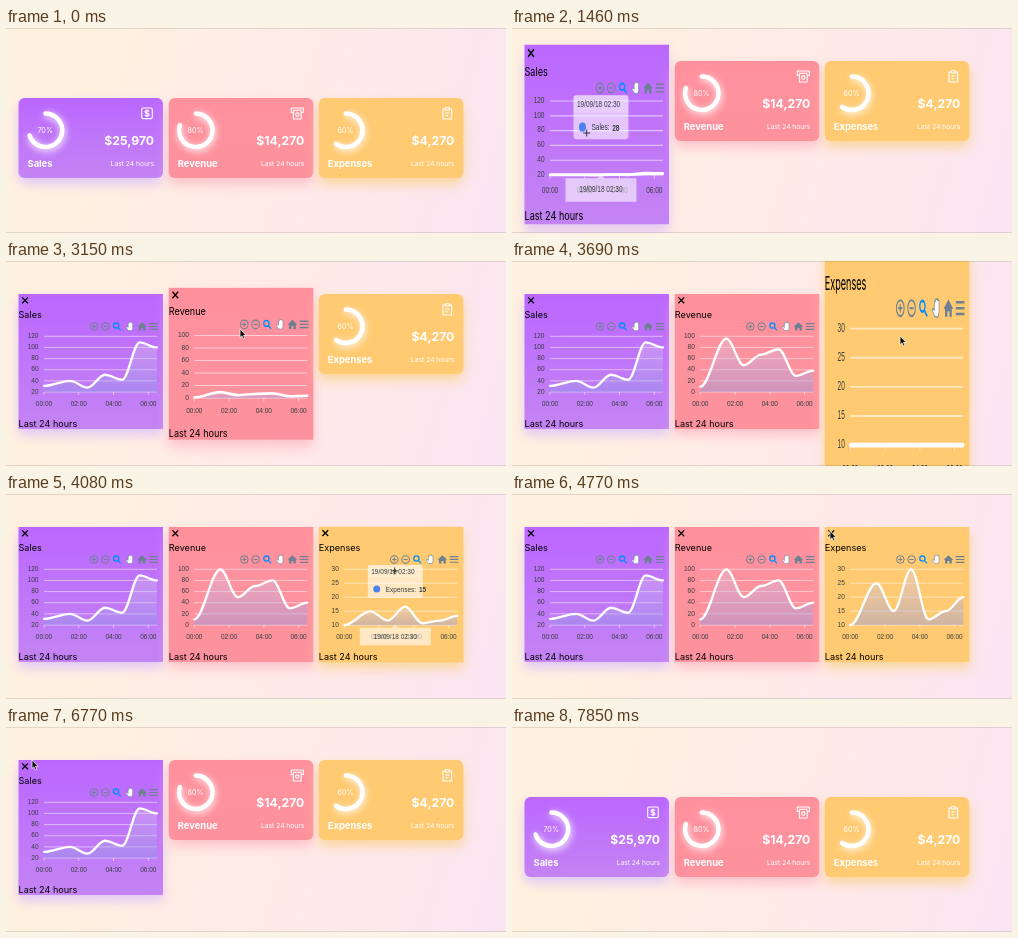
Recreate the animation shown at these times as an HTML page. Size 500 px wide and 205 px high, loop 8.54 s.

```html
<!DOCTYPE html>
<html lang="en">
<head>
<meta charset="utf-8">
<title>Dashboard cards</title>
<style>
  html, body { margin: 0; width: 100%; height: 100%; overflow: hidden; }
  body { background: linear-gradient(106.4deg, #fff1df 12%, #ffe9e9 62%, #fbe5f2 100%); }
  svg { display: block; width: 100%; height: 100%; }
  text { font-family: Inter, sans-serif; dominant-baseline: central; }
  .axis text, .tip text { font: 6.5px "Liberation Sans", Arial, sans-serif; fill: #373d3f; }
  .ring { fill: none; stroke: #fff; stroke-width: 4.5; stroke-linecap: round;
          filter: drop-shadow(1.2px 2.4px 3.5px #fff); }
  .icon { fill: none; stroke: #fff; stroke-width: 1.1; stroke-linejoin: round; }
  .tools { fill: none; stroke: #6e8192; stroke-width: 1; }
  .line { fill: none; stroke: #fff; stroke-width: 2.3; stroke-linecap: round; }
  .grid { stroke: #fff; stroke-opacity: .55; stroke-width: .9; }
</style>
</head>
<body>
<svg id="stage" viewBox="0 0 500 205"></svg>
<script>
const LOOP = 8540, FPS = 13, LAYOUT_MS = 450;
const W = 144.5, COMPACT_H = 80, ROW_OPEN = 33, ROW_IDLE = 70, FULL_H = 135;
const MID = ROW_OPEN + FULL_H / 2;
const PLOT = { left: 25.5, right: 138.5, top: 75.3, bottom: 131 };
const HOURS = [0, 1.5, 2.5, 3.5, 4.5, 5.5, 6.5];

const cards = [
  { title: 'Sales', x: 12.5, percent: 70, value: '$25,970', colors: ['#bb67ff', '#c484f3'], glow: '#e0c6f5',
    data: [31, 40, 28, 51, 42, 109, 100], min: 20, max: 120, step: 20, open: 1280, close: 7000,
    icon: '<rect x="123.2" y="10" width="10.6" height="10.6" rx="1.3"/><path d="M130.6 13.3Q130 12.6 128.5 12.6C125.9 12.6 126 15.2 128.5 15.3C131.2 15.4 131.2 18 128.5 18Q127 18 126.3 17.2M128.5 11.5V19"/>' },
  { title: 'Revenue', x: 162.8, percent: 80, value: '$14,270', colors: ['#ff919d', '#fc929d'], glow: '#fdc0c7',
    data: [10, 100, 50, 70, 80, 30, 40], min: 0, max: 100, step: 20, open: 2895, close: 6130,
    icon: '<path d="M124 14.5H122.5V10H134.5V14.5H133M124.5 12.3H132.5M124.6 12.5V21H132.4V12.5"/><circle cx="128.5" cy="16.6" r="1.7"/>' },
  { title: 'Expenses', x: 312.8, percent: 60, value: '$4,270', colors: ['#ffca71', '#ffca71'], glow: '#f9d59b',
    data: [10, 25, 15, 30, 12, 15, 20], min: 10, max: 30, step: 5, open: 3665, close: 4900,
    icon: '<path d="M126.3 11H124.2V21H132.8V11H130.7M126.5 9.8H130.5V12H126.5ZM126.4 15H130.6M126.4 17.8H129.4"/>' }
];

// time, x, y
const pointerPath = [
  [77, 418, 163], [770, 165, 110], [920, 110, 107], [1080, 74, 104], [2150, 74, 104],
  [2538, 228, 65], [2770, 234, 68], [3150, 234, 68], [3620, 388, 75], [4200, 388, 76],
  [4690, 319, 39], [4769, 318, 37], [5300, 318, 37], [5770, 174, 39], [5923, 172, 38],
  [6260, 172, 38], [6540, 27, 28], [6769, 26, 33], [6923, 18, 38], [7540, 18, 38],
  [7770, 494, 150], [7846, 494, 150]
];

const clamp = v => Math.max(0, Math.min(1, v));
const mix = (a, b, k) => a + (b - a) * k;
const text = (s, x, y, size, extra = '') => `<text x="${x}" y="${y}" font-size="${size}" ${extra}>${s}</text>`;
const hourX = h => mix(PLOT.left, PLOT.right, h / 6.5);
const clock = h => `0${Math.floor(h)}:${h % 1 ? '30' : '00'}`;

// cubic-bezier(.4, 0, .1, 1)
function layoutEase(x) {
  let lo = 0, hi = 1, s = .5;
  for (let i = 0; i < 24; i++) {
    s = (lo + hi) / 2;
    const at = 1.2 * s * (1 - s) ** 2 + .3 * s * s * (1 - s) + s ** 3;
    if (at < x) lo = s; else hi = s;
  }
  return 3 * s * s - 2 * s ** 3;
}

function compactMarkup(c) {
  const angle = c.percent / 100 * 2 * Math.PI, r = 16.7, cx = 27, cy = 32.3;
  const arc = `M${cx} ${cy - r}A${r} ${r} 0 1 1 ${cx + r * Math.sin(angle)} ${cy - r * Math.cos(angle)}`;
  return `<rect class="shadow" y="6" width="${W}" height="${COMPACT_H}" rx="6" fill="${c.glow}" filter="url(#blur)"/>
    <rect width="${W}" height="${COMPACT_H}" rx="6" fill="url(#bg${c.title})"/>
    <path class="ring" d="${arc}"/><g class="icon">${c.icon}</g>
    <g fill="#fff">${text(c.percent + '%', cx - .3, cy, 7.2, 'text-anchor="middle"')}
    ${text(c.title, 9, 65.5, 9.4, 'font-weight="700"')}
    ${text(c.value, 135.5, 42.5, 12.2, 'font-weight="700" text-anchor="end"')}
    ${text('Last 24 hours', 135.5, 66.3, 6.7, 'text-anchor="end"')}</g>`;
}

function axisMarkup(c) {
  let out = '';
  for (let v = c.min; v <= c.max; v += c.step) {
    const y = mix(PLOT.bottom, PLOT.top, (v - c.min) / (c.max - c.min));
    out += `<path class="grid" d="M${PLOT.left} ${y}H${PLOT.right}"/>` + text(v, 20, y - .8, 6.5, 'text-anchor="end"');
  }
  for (let h = 0; h <= 6; h += 2) {
    const x = hourX(h);
    out += `<path class="grid" d="M${x} ${PLOT.bottom}v3"/>` + text(clock(h), x, 142.3, 6.5, 'text-anchor="middle"');
  }
  return `<g class="axis">${out}</g>`;
}

const toolsMarkup = `<g class="tools">
  <circle cx="75.5" cy="65.5" r="3.8"/><path d="M73.5 65.5h4M75.5 63.5v4"/>
  <circle cx="86.8" cy="65.5" r="3.8"/><path d="M84.8 65.5h4"/>
  <g stroke="#008ffb" stroke-width="1.3"><circle cx="97.6" cy="64.6" r="2.6"/><path d="M99.6 66.6l2.7 2.8"/></g>
  <path stroke-width=".6" fill="#fff" d="M109.8 69.5L107.3 66.2L108.3 65.5L109.6 66.5V62.2H110.6V61.3H111.7V61H112.8V61.8H114.2V67.5L113.2 69.8Z"/>
  <path fill="#6e8192" stroke="none" d="M118.8 65.8L123.6 61.3L128.4 65.8H127V69.6H124.6V67H122.6V69.6H120.2V65.8Z"/>
  <path stroke-width="1.2" d="M131 62.7h8.6M131 65.5h8.6M131 68.3h8.6"/></g>`;

function expandedMarkup(c) {
  return `<rect y="39" width="${W}" height="${FULL_H}" fill="${c.glow}" filter="url(#blur)"/>
    <rect y="33" width="${W}" height="${FULL_H}" fill="url(#bg${c.title})"/>
    <path d="M3.6 36.4l5.8 5.8M9.4 36.4l-5.8 5.8" stroke="#000" stroke-width="1.3"/>
    ${text(c.title, 0, 53.8, 9.1)}${text('Last 24 hours', 0, 162, 9.1)}
    ${axisMarkup(c)}<path class="area" fill="url(#area)"/><path class="line"/>${toolsMarkup}<g class="tip"></g>`;
}

const gradient = (id, stops) => `<linearGradient id="${id}" x2="0" y2="1">${stops}</linearGradient>`;
const stage = document.getElementById('stage');
stage.innerHTML = `<defs>
  <filter id="blur" x="-30%" y="-40%" width="160%" height="180%"><feGaussianBlur stdDeviation="6"/></filter>
  ${gradient('area', '<stop stop-color="#e4cdea" stop-opacity=".34"/><stop offset="1" stop-color="#8c96e6" stop-opacity=".42"/>')}
  ${cards.map(c => gradient('bg' + c.title, `<stop stop-color="${c.colors[0]}"/><stop offset="1" stop-color="${c.colors[1]}"/>`)).join('')}
  </defs>
  ${cards.map(c => `<g class="compact">${compactMarkup(c)}</g><g class="expanded">${expandedMarkup(c)}</g>`).join('')}
  <path d="M0 .5H500M0 204.5H500" stroke="#000" stroke-opacity=".11"/>
  <g id="pointer">
    <path data-kind="arrow" d="M0 0V8.6L2 6.9L3.4 10L4.9 9.3L3.5 6.3H6.2Z" fill="#111" stroke="#fff" stroke-width=".7"/>
    <path data-kind="hand" d="M-1 0.6Q0 -.6 1 .6V3.6L5.6 4.6Q6.6 5 6.4 6.4L5.4 9.6H.2L-3 5.8Q-2.6 4.4 -1 5.6Z" fill="#fff" stroke="#222" stroke-width=".9"/>
    <path data-kind="cross" d="M-2.8 1H4.2M.7 -2.5V4.5" stroke="#222" stroke-width=".9"/>
  </g>`;

const compacts = stage.querySelectorAll('.compact'), expandeds = stage.querySelectorAll('.expanded');
cards.forEach((c, i) => {
  c.compact = compacts[i];
  c.expanded = expandeds[i];
  for (const part of ['line', 'area', 'tip']) c[part] = c.expanded.querySelector('.' + part);
  c.shadow = c.compact.querySelector('.shadow');
});
const pointer = document.getElementById('pointer');
const show = (el, on) => el.setAttribute('display', on ? 'inline' : 'none');

function pointerAt(t) {
  if (t < 76 || t >= 7840) return null;
  const n = Math.max(1, pointerPath.findIndex(k => k[0] > t));
  const [t0, x0, y0] = pointerPath[n - 1], [t1, x1, y1] = pointerPath[n];
  const k = clamp((t - t0) / (t1 - t0)), s = k * k * (3 - 2 * k);
  return { x: mix(x0, x1, s), y: mix(y0, y1, s) };
}

function drawLine(c, grow) {
  const points = c.data.map((v, i) => [hourX(HOURS[i]),
    mix(PLOT.bottom, PLOT.top, (v - c.min) / (c.max - c.min) * grow)]);
  let d = `M${points[0]}`;
  for (let i = 1; i < points.length; i++) {
    const [x0, y0] = points[i - 1], [x, y] = points[i], reach = (x - x0) * .35;
    d += `C${x0 + reach} ${y0} ${x - reach} ${y} ${x} ${y}`;
  }
  c.line.setAttribute('d', d);
  c.area.setAttribute('d', `${d}V${PLOT.bottom}H${PLOT.left}Z`);
}

function drawTip(c, localX) {
  const near = HOURS.reduce((best, h, i) =>
    Math.abs(hourX(h) - localX) < Math.abs(hourX(HOURS[best]) - localX) ? i : best, 0);
  const x = hourX(HOURS[near]), stamp = '19/09/18 ' + clock(HOURS[near]);
  c.tip.innerHTML = `<g fill="#fff" fill-opacity=".58">
      <rect x="${x - 20}" y="71" width="55" height="33" rx="2.5"/><rect x="${x - 20}" y="71" width="55" height="13" fill-opacity=".15"/>
      <path d="M${x - 28} 133.5h32l3.5 -3l3.5 3h32v17.5h-71z"/></g>
    <circle cx="${x - 11}" cy="95" r="3.5" fill="#4d80f0"/>
    ${text(stamp, x - 16.5, 77.7, 6.5)}${text(stamp, x + 7.5, 142, 6.5, 'text-anchor="middle"')}
    ${text(`${c.title}: <tspan dx="1" font-weight="700">${c.data[near]}</tspan>`, x - 2, 95, 6.5)}`;
}

function render(t) {
  const isOpen = c => t >= c.open && t < c.close;
  const rowTop = cards.some(isOpen) ? ROW_OPEN : ROW_IDLE;
  const p = pointerAt(t);
  let kind = 'arrow';

  for (const c of cards) {
    const open = isOpen(c), localX = p ? p.x - c.x : -1;
    show(c.compact, !open);
    show(c.expanded, open);
    if (open) {
      const rest = 1 - layoutEase(clamp((t - c.open) / LAYOUT_MS));
      c.expanded.setAttribute('transform',
        `translate(${c.x} ${MID + 20 * rest}) scale(1 ${1 + 1.1 * rest}) translate(0 ${-MID})`);
      drawLine(c, .5 - .5 * Math.cos(Math.PI * clamp((t - c.open - 100) / 800)));
      const inPlot = p && t > c.open + 100 && localX > PLOT.left && localX < PLOT.right
        && p.y > PLOT.top && p.y < PLOT.bottom;
      show(c.tip, inPlot);
      if (inPlot) {
        kind = 'cross';
        drawTip(c, localX);
      }
    } else {
      const k = t < c.close ? 1 : layoutEase(clamp((t - c.close) / LAYOUT_MS));
      const top = mix(ROW_OPEN, rowTop, k), height = mix(FULL_H, COMPACT_H, k);
      c.compact.setAttribute('transform', `translate(${c.x} ${t < c.close ? rowTop : top}) scale(1 ${height / COMPACT_H})`);
      const hover = p && localX > 0 && localX < W && p.y > top && p.y < top + height;
      show(c.shadow, !hover);
      if (hover) kind = 'hand';
    }
  }

  show(pointer, p);
  if (p) {
    pointer.setAttribute('transform', `translate(${p.x} ${p.y})`);
    for (const shape of pointer.children) show(shape, shape.dataset.kind === kind);
  }
}

const start = performance.now();
function tick() {
  const t = (performance.now() - start) % LOOP;
  render(Math.floor((t + 5) * FPS / 1000) * 1000 / FPS);
  requestAnimationFrame(tick);
}
tick();
</script>
</body>
</html>
```
